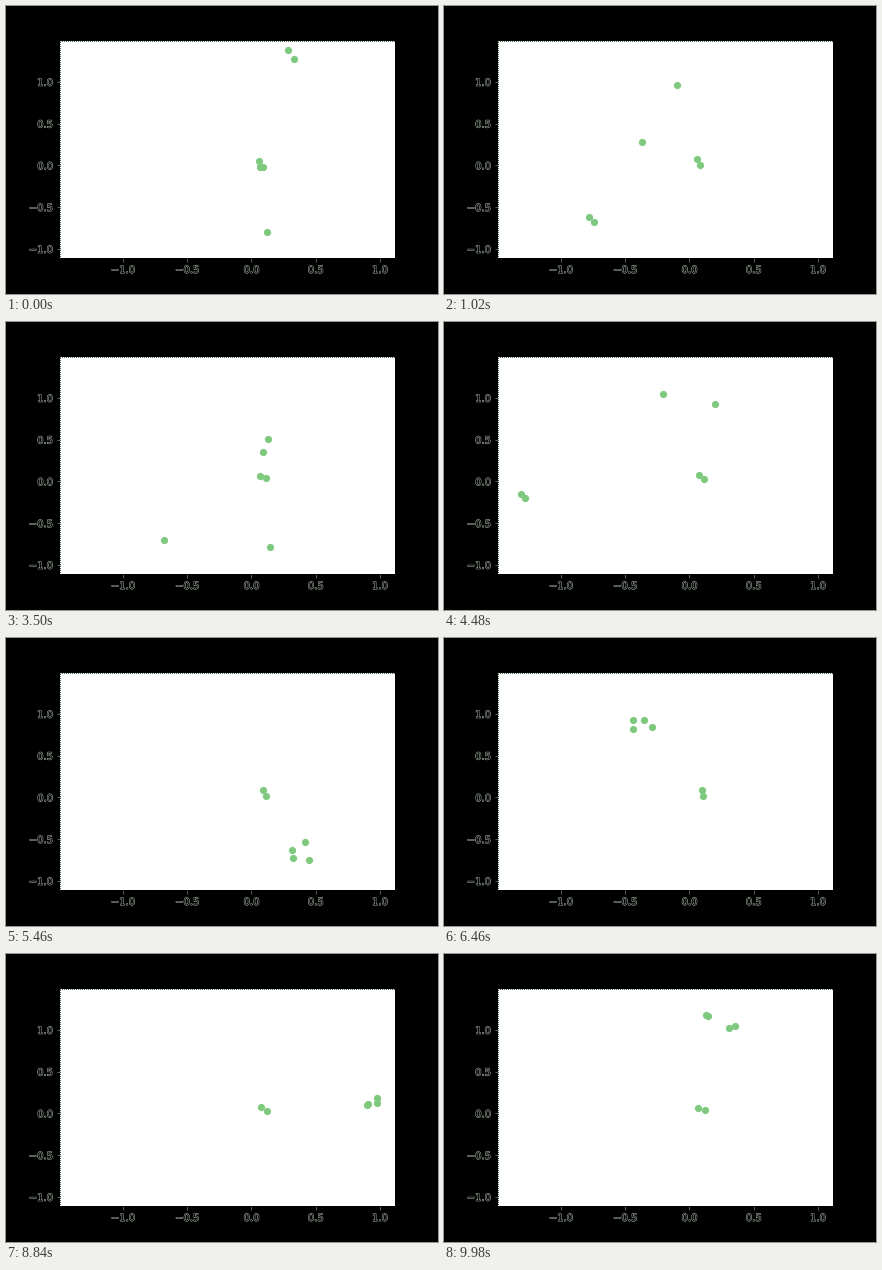
These frames come from a looping animation (432 px wide and 288 px high, 10 s). A matplotlib script:

```python
import numpy as np
import matplotlib.pyplot as plt
from matplotlib.animation import FuncAnimation
import matplotlib.patheffects as pe

W, H = 432, 288
FRAMES, STEP = 500, 20
GREEN = "#7fc97f"
CENTRE = np.array([250, 155])  # stage pixels, y down
UNIT = np.array([128.5, 83.5])  # pixels per data unit
LAP = 84.5  # usual frames per clockwise lap

# Where each runner is at the key frames, in stage pixels.
KEYS = np.array([0, 103, 175, 273, 376, 442, 499])
RUNNERS = [
    [(282, 44), (288, 154), (262, 117), (299, 204), (281, 212), (371, 144), (262, 61)],
    [(288, 53), (294, 156), (257, 130), (303, 222), (281, 214), (371, 149), (264, 62)],
    [(261, 226), (265, 229), (158, 218), (286, 212), (269, 212), (361, 151), (285, 74)],
    [(257, 161), (284, 158), (264, 225), (287, 220), (279, 219), (362, 150), (291, 72)],
]
now = np.arange(FRAMES)


def orbit(points):
    """Clockwise laps through the key points, swinging wide on the left."""
    x, y = ((np.array(points) - CENTRE) / UNIT).T
    usual = 2 * np.pi * KEYS / LAP
    lag = np.diff(np.arctan2(y, x) - usual)
    turns = np.diff(usual) + (lag + np.pi) % (2 * np.pi) - np.pi
    angle = np.interp(now, KEYS, np.arctan2(y[0], x[0]) + np.append(0, np.cumsum(turns)))
    radius = np.interp(now, KEYS, np.hypot(x, y))
    between = np.abs(np.sin(np.pi * np.interp(now, KEYS, np.arange(len(KEYS)))))
    swing = 0.8 * np.sin(2 * np.pi * now / 760)
    radius += swing * between * np.maximum(-np.cos(angle), 0)
    return CENTRE + UNIT * radius[:, None] * np.column_stack([np.cos(angle), np.sin(angle)])


def inner(side):
    """One dot of the close pair rocking about its drifting middle."""
    angle = np.radians(50 + 35 * np.cos(2 * np.pi * now / 330))
    x = 253.5 + 5 * np.sin(np.pi * now / 700) + side * 3.3 * np.cos(angle)
    y = 155 + 3 * np.exp(-now / 40) + side * 3.3 * np.sin(angle)
    return np.column_stack([x, y])


paths = np.stack([orbit(p) for p in RUNNERS] + [inner(-1), inner(1)], axis=1)

fig = plt.figure(figsize=(W / 72, H / 72), dpi=72, facecolor="black")
ax = fig.add_axes([0.125, 0.125, 0.775, 0.755])
ax.set(xlim=(-1.49, 1.115), ylim=(-1.11, 1.494))
ticks = np.arange(-1, 1.1, 0.5)
ax.set_xticks(ticks)
ax.set_yticks(ticks)
ax.tick_params(color="#777777", width=0.8)
for label in ax.get_xticklabels() + ax.get_yticklabels():
    label.set(fontsize=10, family="DejaVu Sans", color="black")
    label.set_path_effects([pe.withStroke(linewidth=0.9, foreground="#b4c4b4")])
ax.spines["right"].set_visible(False)
for side in ("left", "top"):
    ax.spines[side].set(color="#406540", linewidth=1, capstyle="butt",
                        linestyle=(0.5, (1, 1)))

dots = ax.scatter([], [], s=36, color=GREEN, linewidth=1.2)


def draw(frame):
    stage = paths[frame] * [1, -1] + [0, H]
    dots.set_offsets(ax.transData.inverted().transform(stage))
    return dots,


anim = FuncAnimation(fig, draw, frames=FRAMES, interval=STEP, repeat=True,
                     repeat_delay=0, blit=True)
plt.show()
```
